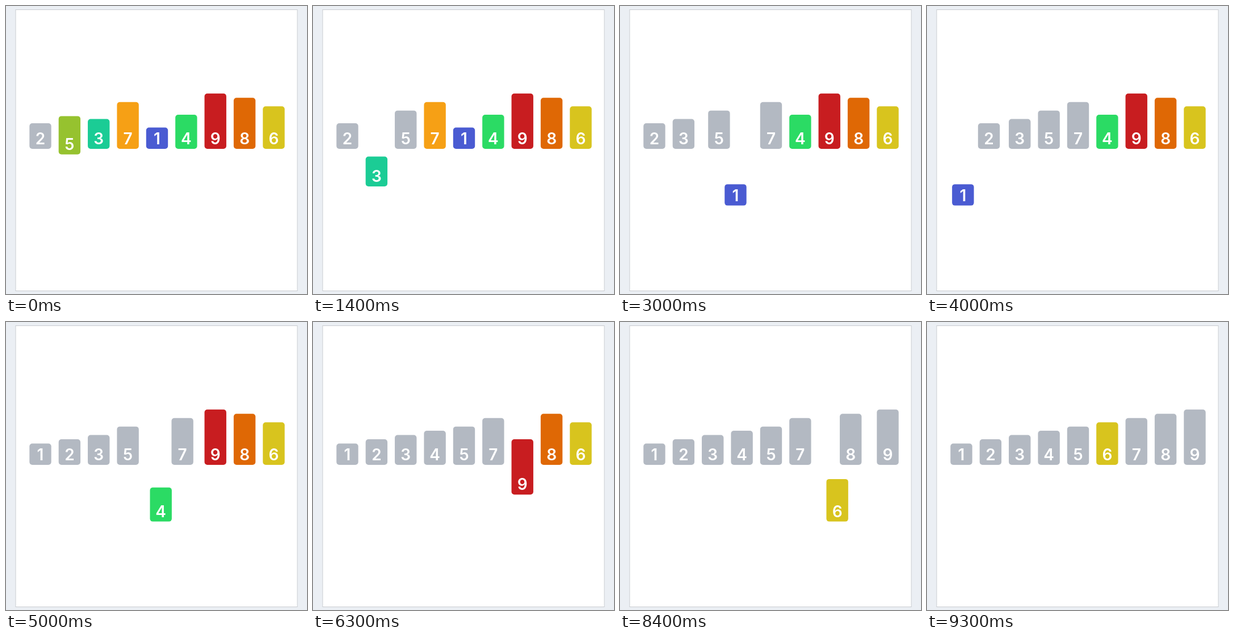
An HTML page with a canvas for the animation above (9.4 s loop, 530 px wide and 506 px high).

```html
<!DOCTYPE html>
<html lang="en">
<head>
<meta charset="utf-8">
<title>Insertion sort</title>
<style>
  html, body { margin: 0; width: 100%; height: 100%; overflow: hidden; background: #ebeff4; }
  canvas { display: block; width: 530px; height: 506px; }
</style>
</head>
<body>
<canvas id="stage" width="530" height="506"></canvas>
<script>
const canvas = document.getElementById('stage');
const ctx = canvas.getContext('2d');
const ratio = window.devicePixelRatio || 1;
canvas.width = 530 * ratio;
canvas.height = 506 * ratio;
ctx.scale(ratio, ratio);

const LOOP = 9400;
const TICK = 100;
const VALUES = [2, 5, 3, 7, 1, 4, 9, 8, 6];
const GREY = '#b3b9c2';
const COLORS = {
  1: '#4a5bd2', 2: GREY, 3: '#1bcc95', 4: '#2bdb64', 5: '#96c22f',
  6: '#d8c41e', 7: '#f6a015', 8: '#df6805', 9: '#c81d20'
};

// Start of each insertion in ms, then the end of the last one.
const STARTS = [-91, 536, 1575, 2106, 4416, 5845, 6455, 7463, 9263];

// Relative lengths of a drop or rise, and of a swap.
const LIFT = 3;
const SWAP = 4;
const DROP = 99.7;

const BAR = { x: 41.3, gap: 51.37, width: 38.4, bottom: 250.9, radius: 5 };

function ease(u) {
  u = Math.min(1, Math.max(0, u));
  return u < 0.5 ? 4 * u ** 3 : 1 - 4 * (1 - u) ** 3;
}

function drawBar(value, slot, drop, color) {
  const height = 30 + 7.45 * value;
  const x = BAR.x + slot * BAR.gap;
  const bottom = BAR.bottom + drop * DROP;
  ctx.fillStyle = color;
  ctx.beginPath();
  ctx.roundRect(x, bottom - height, BAR.width, height, BAR.radius);
  ctx.fill();
  ctx.fillStyle = '#fff';
  ctx.fillText(value, x + BAR.width / 2, bottom - 7.8);
}

function drawPanel() {
  ctx.fillStyle = '#ebeff4';
  ctx.fillRect(0, 0, 530, 506);
  ctx.fillStyle = '#c9ccd0';
  ctx.fillRect(16.5, 6, 497, 495);
  ctx.fillStyle = '#fff';
  ctx.fillRect(17.5, 7, 495, 493);
}

function draw(t) {
  drawPanel();
  ctx.font = '600 28px Inter, "Noto Sans CJK JP", sans-serif';
  ctx.textAlign = 'center';
  ctx.textBaseline = 'alphabetic';

  let round = 1;
  while (round < VALUES.length - 1 && t >= STARTS[round]) round++;

  const active = VALUES[round];
  const sorted = VALUES.slice(0, round).sort((a, b) => a - b);
  const swaps = sorted.filter(v => v > active).length;
  const units = 2 * LIFT + swaps * SWAP;
  const start = STARTS[round - 1];
  const now = (t - start) / (STARTS[round] - start) * units;

  let moved = 0;
  sorted.forEach((value, slot) => {
    const turn = round - 1 - slot;
    const shift = turn < swaps ? ease((now - LIFT - turn * SWAP) / SWAP) : 0;
    moved += shift;
    drawBar(value, slot + shift, 0, GREY);
  });
  for (let slot = round + 1; slot < VALUES.length; slot++) {
    drawBar(VALUES[slot], slot, 0, COLORS[VALUES[slot]]);
  }
  const drop = ease(now / LIFT) - ease((now - units + LIFT) / LIFT);
  drawBar(active, round - moved, drop, COLORS[active]);
}

const origin = performance.now();

function frame() {
  // The motion advances ten times a second; the small lead absorbs timer jitter.
  const time = performance.now() - origin + 8;
  draw(Math.floor(time / TICK) * TICK % LOOP);
  requestAnimationFrame(frame);
}
frame();
</script>
</body>
</html>
```
